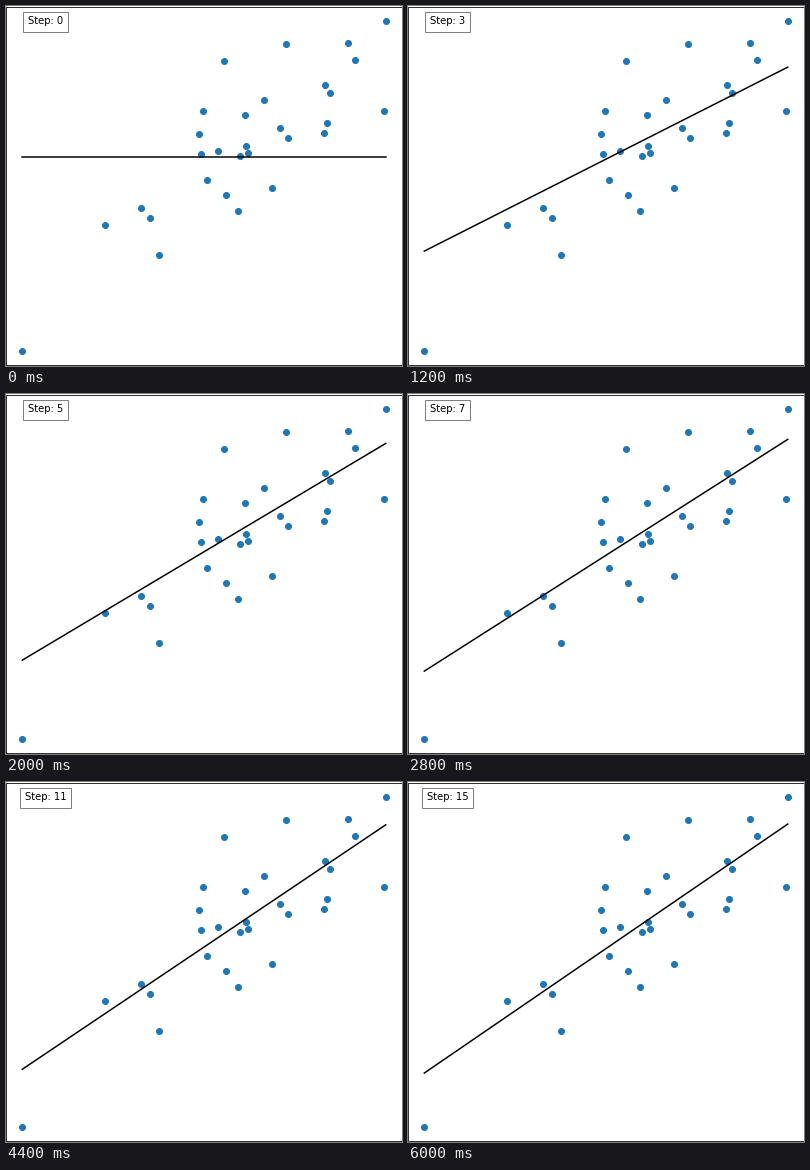
These frames come from a looping animation (396 px wide and 360 px high, 6400 ms). A matplotlib script:

```python
import numpy as np
import matplotlib.pyplot as plt
from matplotlib.animation import FuncAnimation

W, H, DPI = 396, 360, 72
STEPS, INTERVAL = 16, 400
RATE = 0.3

# Stage position of the data origin, and pixels per data unit
X0, Y0 = 208.68, 150.6
X_UNIT, Y_UNIT = 75.36, 30.1

# Noisy samples of y = 2x
rng = np.random.RandomState(0)
x = rng.randn(30)
y = 2 * x + 1.5 * rng.randn(30)
ends = np.array([x.min(), x.max()])


def descend(steps):
    """Slope and intercept after each step of gradient descent from zero."""
    slope, intercept = 0.0, 0.0
    path = []
    for _ in range(steps):
        path.append((slope, intercept))
        error = slope * x + intercept - y
        slope -= RATE * np.mean(error * x)
        intercept -= RATE * np.mean(error)
    return path


path = descend(STEPS)

fig = plt.figure(figsize=(W / DPI, H / DPI), dpi=DPI, facecolor="white")
ax = fig.add_axes([0, 0, 1, 1])
ax.set_xlim(-X0 / X_UNIT, (W - X0) / X_UNIT)
ax.set_ylim((Y0 - H) / Y_UNIT, Y0 / Y_UNIT)
ax.axis("off")

# Plot border; its right side lies just outside the stage
left, right, top, bottom = 0, W + 4, H - 1, 1
ax.plot([right, left, left, right], [top, top, bottom, bottom],
        color="black", lw=0.8, transform=None)

ax.scatter(x, y, s=36, color="#1f77b4", zorder=1)
line, = ax.plot(ends, 0 * ends, color="black", lw=1.5, zorder=2)
label = ax.text(39.5, H - 15.5, "", transform=None, ha="center", va="center",
                fontsize=10, family="DejaVu Sans", zorder=3,
                bbox=dict(facecolor="white", alpha=0.5, pad=5))


def draw(step):
    slope, intercept = path[step]
    line.set_ydata(slope * ends + intercept)
    label.set_text(f"Step: {step}")
    return line, label


anim = FuncAnimation(fig, draw, frames=STEPS, interval=INTERVAL, repeat=True)
plt.show()
```
